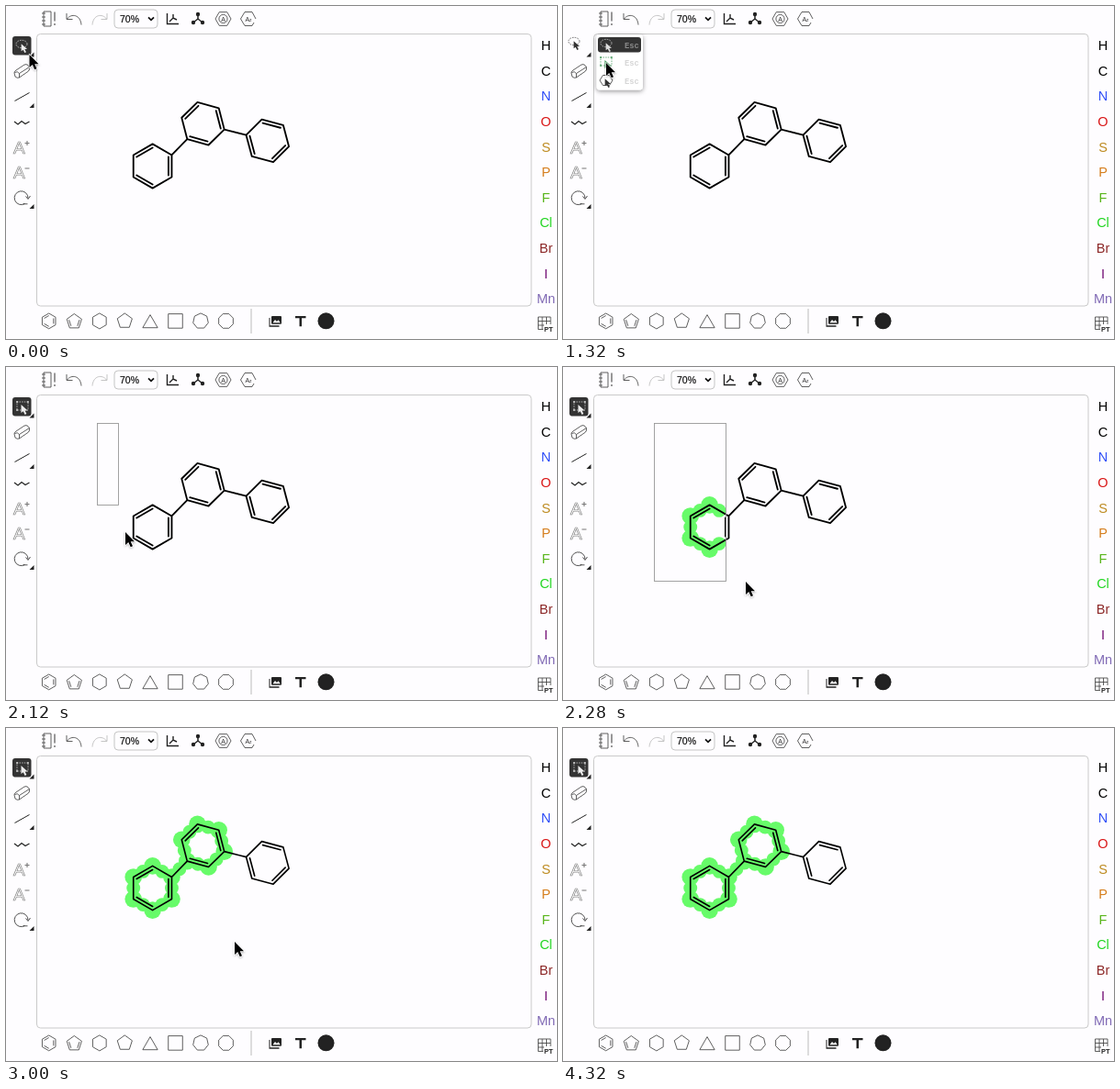
Animation of 600 by 363 pixels, one loop 4360 ms. Source, as an HTML page:

```html
<!DOCTYPE html>
<html lang="en">
<head>
<meta charset="utf-8">
<title>Molecule editor selection</title>
<style>
  html, body { margin: 0; width: 100%; height: 100%; overflow: hidden; background: #fefdff; }
  svg { display: block; width: 100vw; height: 100vh; }
  text { font-family: "Liberation Sans", Arial, sans-serif; }
  .mono text { font: bold 8.8px "Liberation Mono", monospace; }
  .icon { fill: none; stroke: #444; stroke-width: .85; }
  .solid { fill: #222; stroke: none; }
</style>
</head>
<body>
<svg viewBox="0 0 600 363" xmlns="http://www.w3.org/2000/svg">
  <defs>
    <filter id="shadow" x="-30%" y="-30%" width="160%" height="170%">
      <feDropShadow dx="0" dy="1.5" stdDeviation="2.6" flood-opacity=".42"/>
    </filter>
    <filter id="soft" x="-50%" y="-50%" width="200%" height="200%">
      <feDropShadow dx="0" dy="1" stdDeviation=".8" flood-opacity=".3"/>
    </filter>
    <path id="arrow" d="M-1.500-2V7L.8 5.200L2.600 9L4.400 8.100L2.600 4.500H5.600Z" fill="currentColor"/>
    <g id="lasso"><ellipse cx="-1" cy="-1.500" rx="6" ry="4.200" fill="none" stroke="currentColor" stroke-width=".7" stroke-dasharray="1.6 1.1"/><use href="#arrow" transform="scale(.9)"/></g>
    <g id="marquee"><path d="M-6-5H6V4H-6Z" fill="none" stroke="currentColor" stroke-width=".7" stroke-dasharray="1.4 1.2"/><path d="M-6.800-5.800h1.600v1.600h-1.600zM5.200-5.800h1.600v1.600h-1.600zM-6.800 3.200h1.600v1.600h-1.600z" fill="currentColor"/><use href="#arrow"/></g>
    <g id="fragment"><path d="M-3.500-5.500H3.500L7 0L3.500 5.500H-3.500L-7 0Z" fill="none" stroke="currentColor" stroke-width=".8"/><use href="#arrow" transform="scale(.9)"/></g>
    <path id="undo" d="M66 8V14.500H72.500M66.500 14C71 8 81 9 82 20.500"/>
  </defs>
  <rect width="600" height="363" fill="#fefdff"/>
  <rect x="33.500" y="30.500" width="538.500" height="296.500" rx="4" fill="none" stroke="#cacaca"/>
  <g id="top" class="icon">
    <path d="M41 6H49V22H41Z"/><path d="M39 8h4M39 12h4M39 16h4M39 20h4"/>
    <path d="M53 6.500V16.500M53 19V21" stroke-width="1.1"/>
    <use href="#undo"/>
    <use href="#undo" transform="matrix(-1 0 0 1 176 0)" stroke="#bbb"/>
    <rect x="118" y="4" width="47" height="20" rx="4" stroke="#bbb"/>
    <path d="M155 12.300l3 3l3-3" stroke="#111" stroke-width="1.800"/>
    <path d="M175.500 8V19.500H188M178 17L182 13L186 15M182 13V9" stroke="#222" stroke-width="1.400"/>
    <path d="M209 9V14L204 18M209 14L214 18" stroke="#222" stroke-width="1.500"/>
    <g class="solid"><circle cx="209" cy="9" r="2.200"/><circle cx="204" cy="18" r="2.200"/><circle cx="214" cy="18" r="2.200"/></g>
    <circle cx="236.500" cy="14" r="4.600"/>
    <path d="M272 14L268 6.500H260L255.500 14L260 21.500H268L270 18"/>
  </g>
  <text x="124" y="17.500" font-size="10.500" fill="#111" stroke="#111" stroke-width=".2">70%</text>
  <text x="236.500" y="16.600" font-size="7" text-anchor="middle" fill="#333">A</text>
  <text x="264" y="16.600" font-size="7" text-anchor="middle" fill="#333">A<tspan font-size="5">z</tspan></text>

  <g id="tool"><rect id="active" x="7" y="33" width="20.500" height="20.500" rx="3" fill="#333"/><use id="toolIcon"/></g>
  <g class="icon">
    <path d="M9 73Q9 71 11 70L20 64Q22 63 24 64.500Q26 66 25.500 69L24.500 71L14.500 78Q12 79 10 77ZM9.500 72.500Q12.500 70.500 14.500 73.500V78M14.500 73.500L25.500 66.500"/>
    <path d="M9.500 103.500L25.500 94.500" stroke="#222" stroke-width="1"/>
    <path d="M9 126L13 129L17 125.500L21 128.500L25.500 126" stroke="#222" stroke-width="1.200"/>
    <path d="M20.500 215.500A7.400 7.400 0 1 1 24 209.500M21.500 207.500L24 210.500L26.500 207M18.500 215.800H23.500" stroke="#333"/>
    <path d="M20.500 149.500h5M23 147v5M20.500 177h5" stroke="#777" stroke-width="1.100"/>
    <g fill="#fff" stroke="#888" stroke-width=".7" font-size="19"><text x="8" y="160.500">A</text><text x="8" y="188">A</text></g>
  </g>
  <path id="corner" d="M30.500 50.500V55.500H25.500Z" fill="#222"/>
  <path d="M30.500 106V111H25.500ZM30.500 216V221H25.500Z" fill="#222"/>

  <g id="templates" class="icon"></g>
  <path d="M267 330V357" stroke="#bbb"/>
  <g class="solid">
    <path d="M287.500 340V348.200H297.500V349.700H286.500V340Z"/><rect x="289" y="338" width="11" height="8.800" rx="1"/>
    <path d="M315 338H326.500V340.300H322V349.300H319.500V340.300H315Z"/>
    <circle cx="348.500" cy="343.300" r="9"/>
  </g>
  <path d="M290.500 345.300L293 342L295 344L296.500 342.300L298.800 345.300Z" fill="#fff"/>
  <path class="icon" d="M593 347V339H579.500V352.500H585M579.500 343.500H593M579.500 348H586M584 339V352M588.500 339V347" stroke="#888"/>
  <text x="586" y="354.500" font-size="7.500" font-weight="bold" fill="#222">PT</text>
  <g id="elements" font-size="14.500" text-anchor="middle"></g>

  <g id="glow" fill="#67fb69"></g>
  <path id="bonds" fill="none" stroke="#000" stroke-linecap="round" stroke-linejoin="round"/>
  <rect id="band" fill="none" stroke="#999" stroke-width=".9"/>
  <g id="menu">
    <rect x="36.500" y="31" width="50.500" height="60.500" rx="4" fill="#fff" filter="url(#shadow)"/>
    <rect x="38" y="34" width="47" height="16.500" rx="3" fill="#333"/>
    <g color="#ddd"><use href="#lasso" x="48" y="42"/></g>
    <g id="second"><use href="#marquee" x="47" y="61"/></g>
    <g color="#333"><use href="#fragment" x="47" y="81"/></g>
    <g class="mono"><text x="67" y="46" fill="#8a8a8a">Esc</text><text x="67" y="65" fill="#d6d6d6">Esc</text><text x="67" y="84.500" fill="#d6d6d6">Esc</text></g>
  </g>
  <g id="cursor" filter="url(#soft)"><path d="M0 0V14L3.300 11L5.700 16.200L8 15.200L5.700 10.200H10Z" fill="#000" stroke="#fff" stroke-width="1.200" paint-order="stroke"/></g>
</svg>
<script>
const LOOP = 4360, STEP = 40;
const $ = id => document.getElementById(id);
const show = (el, on) => el.setAttribute('visibility', on ? 'visible' : 'hidden');
const setAll = (el, attrs) => Object.entries(attrs).forEach(([k, v]) => el.setAttribute(k, v));
const add = (parent, tag, attrs, text = '') => {
  const el = document.createElementNS('http://www.w3.org/2000/svg', tag);
  setAll(el, attrs);
  el.textContent = text;
  return parent.appendChild(el);
};
const polygon = (cx, cy, n, r, turn = -90) => Array.from({ length: n }, (_, i) => {
  const a = (turn + i * 360 / n) * Math.PI / 180;
  return [cx + r * Math.cos(a), cy + r * Math.sin(a)];
});
const outline = pts => 'M' + pts.map(p => p.map(v => v.toFixed(2)).join(' ')).join('L');
const mix = (a, b, k) => a.map((v, i) => v + (b[i] - v) * k);
const middle = (a, b) => mix(a, b, .5);

// A ring outline with inner lines along the listed edges.
function ringPath(cx, cy, pts, edges, inset) {
  const inner = pts.map(p => mix(p, [cx, cy], inset));
  return outline(pts) + 'Z' +
    edges.map(i => outline([inner[i], inner[(i + 1) % pts.length]])).join('');
}

const rings = [[159.6, 174.5, -90, [1, 3, 5]], [214.5, 128.2, -104.5, [1, 3, 5]], [284.8, 146.9, -105, [0, 2, 4]]]
  .map(([x, y, turn, edges]) => ({ x, y, edges, pts: polygon(x, y, 6, 24.1, turn) }));
const links = [[rings[0].pts[1], rings[1].pts[4]], [rings[1].pts[2], rings[2].pts[5]]];
$('bonds').setAttribute('d',
  rings.map(r => ringPath(r.x, r.y, r.pts, r.edges, .17)).join('') + links.map(outline).join(''));

// Atoms and bond centres light up once the selection reaches them.
const ATOM_GLOW = 9.3, BOND_GLOW = .8 * ATOM_GLOW;
const spots = [];
const addSpot = ([x, y], r) =>
  spots.push({ x, y, el: add($('glow'), 'circle', { cx: x, cy: y, r }) });
rings.forEach(({ pts }) => pts.forEach((p, i) => {
  addSpot(p, ATOM_GLOW);
  addSpot(middle(p, pts[(i + 1) % 6]), BOND_GLOW);
}));
links.forEach(([a, b]) => addSpot(middle(a, b), BOND_GLOW));

const template = d => add($('templates'), 'path', { d });
template(ringPath(46.7, 343.4, polygon(46.7, 343.4, 6, 8.4), [1, 3, 5], .3));
template(ringPath(74.3, 344, polygon(74.3, 344, 5, 8.5), [1, 3], .3));
[[101.8, 6], [129.3, 5], [157, 3], [184.5, 4], [212, 7], [239.5, 8]].forEach(([x, n]) => {
  const r = n === 4 ? 11 : n === 3 ? 9.4 : 8.5;
  template(outline(polygon(x, n === 3 ? 346 : 343.4, n, r, n % 4 ? -90 : -90 + 180 / n)) + 'Z');
});
add($('top'), 'path', { d: outline(polygon(236.5, 14, 6, 8.5, 0)) + 'Z' });

['H #000', 'C #000', 'N #304ff7', 'O #d91515', 'S #bd8a1f', 'P #d57d1b', 'F #59b51b', 'Cl #1fd51f', 'Br #8c2727', 'I #720c75', 'Mn #806ab5']
  .forEach((item, i) => {
    const [name, fill] = item.split(' ');
    add($('elements'), 'text', { x: 588, y: 48.1 + 27.6 * i, fill }, name);
  });

const path = [
  [0, 25.5, 53], [80, 25.5, 53], [240, 35, 60], [320, 36, 61], [480, 26, 54], [800, 26, 54],
  [1080, 43, 60], [1240, 47, 62], [1440, 47, 62], [1600, 72, 61], [1800, 99, 60], [1920, 99, 61],
  [2000, 106, 90], [2120, 130, 180], [2200, 157, 226], [2240, 177, 233], [2280, 199, 234],
  [2360, 232, 234], [2440, 249, 233], [3000, 249, 233], [3120, 262, 235], [3400, 313, 243],
  [3480, 316, 244], [LOOP, 320, 246]
];
function cursorAt(t) {
  const i = path.findIndex(p => p[0] > t);
  const [a, b] = [path[i - 1], path[i]];
  return mix(a, b, (t - a[0]) / (b[0] - a[0])).slice(1);
}

function draw(t) {
  const [x, y] = cursorAt(t);
  setAll($('cursor'), { transform: `translate(${x} ${y})` });
  show($('cursor'), t < 4120);

  const menuOpen = t >= 760 && t < 1400, marquee = t >= 1400;
  show($('menu'), menuOpen);
  show($('active'), !menuOpen);
  $('second').setAttribute('color', y > 58 ? '#2a8a45' : '#333');
  setAll($('toolIcon'), {
    href: marquee ? '#marquee' : '#lasso',
    x: menuOpen ? 13 : 18, y: menuOpen ? 40 : 43, color: menuOpen ? '#333' : '#eee'
  });
  $('corner').setAttribute('fill', menuOpen && t < 1000 ? '#23a548' : '#222');

  // The selection box trails the pointer by one step.
  const dragging = t > 1960 && t < 2720, selected = t >= 2720;
  const [right, bottom] = cursorAt(Math.max(1920, t - STEP));
  show($('band'), dragging);
  if (dragging) setAll($('band'), { x: 99.5, y: 61.5, width: right - 99, height: bottom - 61 });
  const reach = selected ? [249, 233] : dragging ? [right, bottom] : [0, 0];
  spots.forEach(s => show(s.el, s.x < reach[0] && s.y < reach[1]));
  $('bonds').setAttribute('stroke-width', selected ? 1.65 : 1.85);
}

const start = performance.now();
function tick() {
  const t = (performance.now() - start) % LOOP;
  draw(Math.floor(t / STEP) * STEP);
  requestAnimationFrame(tick);
}
tick();
</script>
</body>
</html>
```
